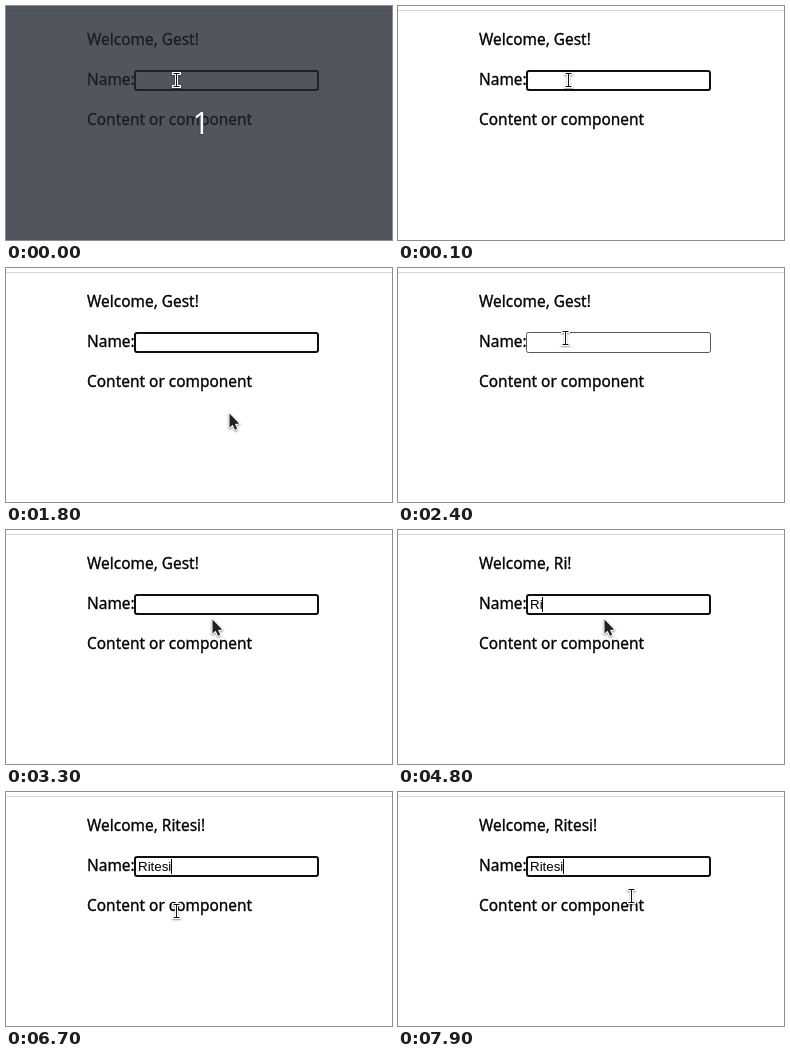
An HTML page with a canvas that plays this animation: 386 by 234 pixels, repeating every 8000 ms.

```html
<!DOCTYPE html>
<html lang="en">
<head>
<meta charset="utf-8">
<title>Name field</title>
<style>
html, body { margin: 0; width: 100%; height: 100%; overflow: hidden; background: #fff; }
canvas { display: block; width: 386px; height: 234px; }
</style>
</head>
<body>
<canvas id="stage" width="386" height="234"></canvas>
<script>
const ctx = document.getElementById('stage').getContext('2d');
const LOOP = 8000, STEP = 100, BLINK = 600;
const BLUR = 2000, FOCUS = 2700;
const NAME = 'Ritesi';
const LEFT = 81;
const PAGE_FONT = '15.45px "Noto Sans", "Open Sans", sans-serif';
const FIELD_FONT = '13.333px "Liberation Sans", Arial, sans-serif';
const FIELD = { x: 128, y: 64, w: 185, h: 21 };

// When each letter is typed, and when the caret starts blinking anew
const keys = [3700, 4800, 5000, 5100, 5400, 6100];
const blinkStarts = [700, FOCUS, 3700, 4800, 5500];

// Pointer moves, each from the place where the last one ended
const home = [170.5, 74];
const moves = [
  { from: 1200, to: 1800, at: [223, 145] },
  { from: 2000, to: 2400, at: [167, 70] },
  { from: 2400, to: 2700, at: [206, 89] },
  { from: 6200, to: 6400, at: [170.5, 119] },
  { from: 6800, to: 7300, at: [233.5, 104] }
];

function pointerAt(t) {
  return moves.reduce(([x, y], { from, to, at }) => {
    const u = Math.min(1, Math.max(0, (t - from) / (to - from)));
    const e = u * u * (3 - 2 * u);
    return [x + (at[0] - x) * e, y + (at[1] - y) * e];
  }, home);
}

function caretOn(t) {
  const start = blinkStarts.findLast(s => s <= t);
  return start !== undefined && Math.floor((t - start) / BLINK) % 2 === 0;
}

function text(str, x, y, font, color = '#000') {
  ctx.font = font;
  ctx.fillStyle = color;
  ctx.fillText(str, x, y);
}

// Page text is slightly heavier than the regular weight
function pageText(str, y) {
  text(str, LEFT, y, PAGE_FONT);
  ctx.lineWidth = 0.3;
  ctx.strokeStyle = '#000';
  ctx.strokeText(str, LEFT, y);
  return { x: LEFT, y: y - 15, w: ctx.measureText(str).width, h: 18 };
}

function drawField(value, focused, caret) {
  const line = focused ? 2 : 1;
  const { x, y, w, h } = FIELD;
  ctx.beginPath();
  ctx.roundRect(x + line / 2, y + line / 2, w - line, h - line, 2);
  ctx.lineWidth = line;
  ctx.strokeStyle = focused ? '#101010' : '#555';
  ctx.stroke();
  text(value, x + 4, 79, FIELD_FONT);
  if (focused && caret) {
    ctx.fillRect(Math.floor(x + 4 + ctx.measureText(value).width), 67, 1, 15);
  }
}

// Strokes the current path in white with a soft shadow
function outline(width) {
  ctx.save();
  ctx.lineWidth = width;
  ctx.strokeStyle = '#fff';
  ctx.shadowColor = 'rgba(0,0,0,.4)';
  ctx.shadowBlur = 2;
  ctx.shadowOffsetY = 1;
  ctx.stroke();
  ctx.restore();
}

function drawArrow(x, y) {
  ctx.save();
  ctx.translate(x, y);
  ctx.lineJoin = 'round';
  const shape = new Path2D('M.5 .5V14.5L3.7 11.7 6 16.8 8.2 15.8 6 10.9 10.2 10.5Z');
  ctx.lineWidth = 2;
  ctx.strokeStyle = '#fff';
  ctx.shadowColor = 'rgba(0,0,0,.45)';
  ctx.shadowBlur = 2;
  ctx.shadowOffsetY = 1;
  ctx.stroke(shape);
  ctx.shadowColor = 'transparent';
  ctx.fillStyle = '#222';
  ctx.fill(shape);
  ctx.restore();
}

function drawBeam(x, y) {
  ctx.save();
  ctx.translate(Math.floor(x) + 0.5, Math.round(y));
  ctx.beginPath();
  for (const end of [-6.5, 6.5]) {
    ctx.moveTo(-3, end);
    ctx.lineTo(3, end);
    ctx.moveTo(0, 0);
    ctx.lineTo(0, end);
  }
  ctx.lineCap = 'square';
  outline(3);
  ctx.lineCap = 'butt';
  ctx.lineWidth = 1;
  ctx.strokeStyle = '#111';
  ctx.stroke();
  ctx.restore();
}

function drawCountdown() {
  ctx.fillStyle = 'rgba(33,38,49,.78)';
  ctx.fillRect(0, 0, 386, 234);
  ctx.save();
  ctx.textAlign = 'center';
  ctx.shadowColor = 'rgba(0,0,0,.5)';
  ctx.shadowBlur = 2;
  text('1', 195, 128, '30px "Noto Sans", "Open Sans", sans-serif', '#fff');
  ctx.restore();
}

function draw(t) {
  const value = NAME.slice(0, keys.filter(k => k <= t).length);
  const focused = t < BLUR || t >= FOCUS;

  ctx.fillStyle = '#fff';
  ctx.fillRect(0, 0, 386, 234);
  ctx.fillStyle = '#d6d6d6';
  ctx.fillRect(0, 4, 386, 1);

  const textAreas = [
    pageText(`Welcome, ${value || 'Gest'}!`, 39),
    pageText('Name:', 79),
    pageText('Content or component', 119),
    FIELD
  ];
  drawField(value, focused, caretOn(t));
  if (t < STEP) drawCountdown();

  const [x, y] = pointerAt(t);
  const overText = textAreas.some(a => x >= a.x && x <= a.x + a.w && y >= a.y && y <= a.y + a.h);
  (overText ? drawBeam : drawArrow)(x, y);
}

const start = performance.now();
function tick() {
  const t = (performance.now() - start) % LOOP;
  draw(Math.floor(t / STEP) * STEP);
  requestAnimationFrame(tick);
}
tick();
</script>
</body>
</html>
```
